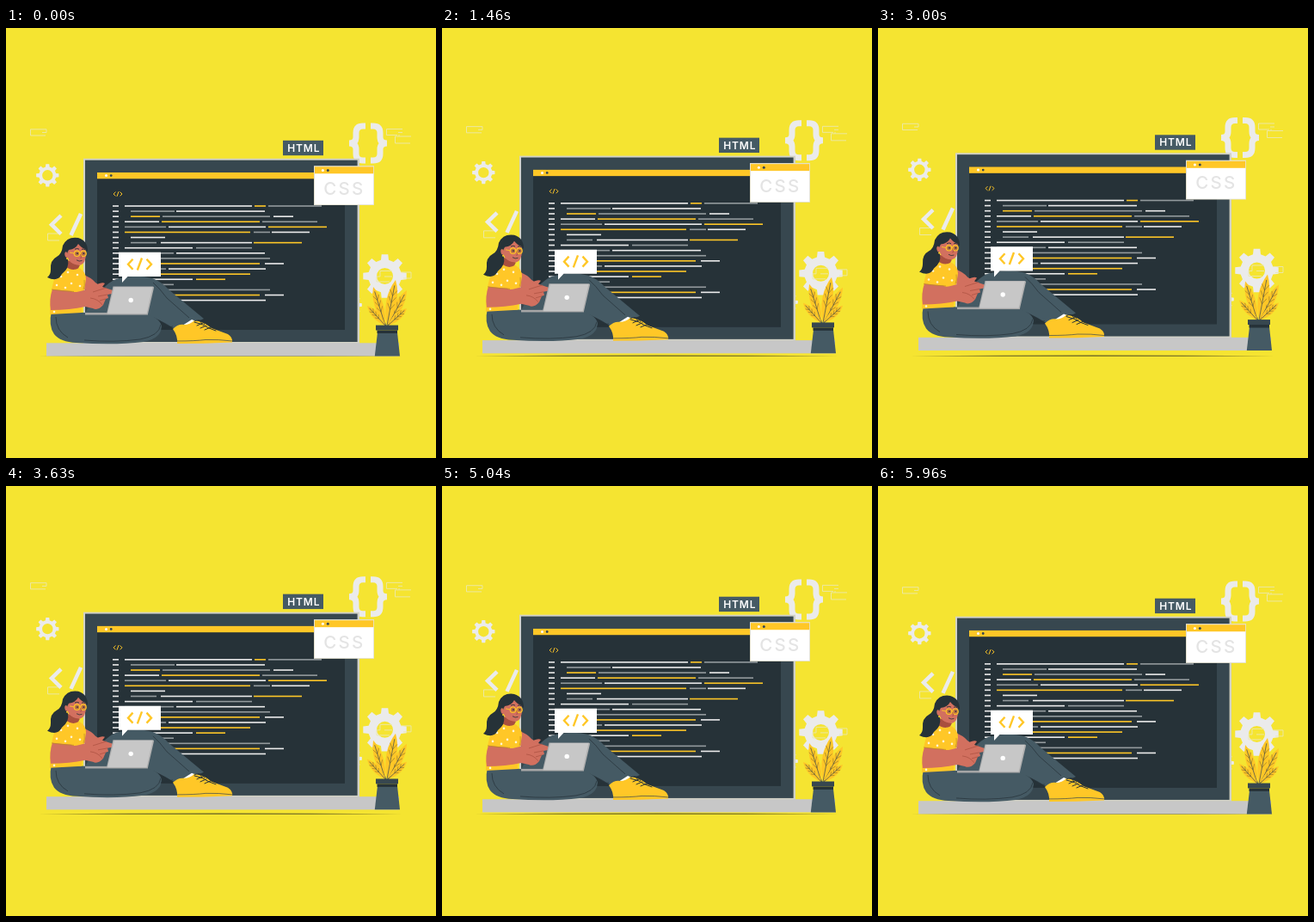
Write an HTML page with a canvas that moves like this. It is 500x500 px and loops after 6000 ms.

```html
<!DOCTYPE html>
<html lang="en">
<head>
<meta charset="utf-8">
<title>Floating workspace</title>
<style>
html, body { margin: 0; width: 100%; height: 100%; overflow: hidden; background: #f5e431; }
canvas { display: block; width: 500px; height: 500px; }
</style>
</head>
<body>
<canvas id="stage"></canvas>
<script>
const LOOP = 6000, LIFT = 6.5;
const BG = '#f5e431', SUN = '#ffc727', INK = '#263238', SLATE = '#37474f', DENIM = '#455a64';
const PALE = '#ebebeb', STEEL = '#c7c7c7', SKIN = '#d2705f', SHADE = '#a9503f', WHITE = '#fff';

const canvas = document.getElementById('stage');
const ctx = canvas.getContext('2d');
const ratio = window.devicePixelRatio || 1;
canvas.width = canvas.height = 500 * ratio;

function fill(d, color) {
  ctx.fillStyle = color;
  ctx.fill(new Path2D(d));
}

function line(d, color, width = 1, cap = 'butt') {
  ctx.strokeStyle = color;
  ctx.lineWidth = width;
  ctx.lineCap = cap;
  ctx.stroke(new Path2D(d));
}

function box(x, y, right, bottom, color) {
  ctx.fillStyle = color;
  ctx.fillRect(x, y, right - x, bottom - y);
}

function dot(x, y, r, color) {
  ctx.fillStyle = color;
  ctx.beginPath();
  ctx.arc(x, y, r, 0, Math.PI * 2);
  ctx.fill();
}

function label(text, x, y, font, spacing, color) {
  ctx.font = font + ' Inter, "Open Sans", sans-serif';
  ctx.letterSpacing = spacing + 'px';
  ctx.fillStyle = color;
  ctx.fillText(text, x, y);
}

function gear(x, y, r, hole) {
  const teeth = 8, step = Math.PI * 2 / teeth;
  const corners = [[-0.3, 0.76], [-0.19, 1], [0.19, 1], [0.3, 0.76]];
  ctx.beginPath();
  for (let i = 0; i < teeth; i++) {
    for (const [turn, reach] of corners) {
      const a = (i + turn) * step - Math.PI / 2;
      ctx.lineTo(x + Math.cos(a) * r * reach, y + Math.sin(a) * r * reach);
    }
  }
  ctx.closePath();
  ctx.moveTo(x + hole, y);
  ctx.arc(x, y, hole, 0, Math.PI * 2);
  ctx.fillStyle = PALE;
  ctx.fill('evenodd');
}

function brace() {
  line('M418 114h-3q-8 0-8 8v5q0 7-8 7q8 0 8 7v5q0 8 8 8h3', PALE, 7);
}

function backdrop() {
  const thin = '#ebe8ae';
  line('M47 121.5V117.8H28.5V125H46M42 121.5h5', thin, 0.9);
  line('M461 117.5H442.5V124.5H455M456 121.5h5', thin, 0.9);
  line('M471 126H452.5V134H470M457 126v-2', thin, 0.9);
  line('M63 239H48.5V247H62', thin, 0.9);
  gear(48.3, 171.3, 13.3, 6.2);
  gear(440.5, 288.5, 25.5, 9.5);
  line('M449 282.5H435V289H431V295H446M440 289h9', thin, 0.9);
  line('M459 284h12v7h-9', thin, 0.9);
  gear(402, 322, 12, 5);
  brace();
  ctx.save();
  ctx.translate(842, 0);
  ctx.scale(-1, 1);
  brace();
  ctx.restore();
  line('M64 218L53 228.7L64 239.5M87 216L75.5 241', PALE, 4.5);
}

const ROWS = [
  'W138-286 Y289-302 G305-367', 'G145-196 W198-301', 'Y145-179 G182-307 W311-334',
  'W138-178 Y181-295 G298-362', 'G138-186 W189-302 Y305-373', 'Y138-284 G288-307 W309-353',
  'W145-185', 'G145-175 W180-286 Y288-344', 'W138-217 G221-286', 'G138-195 W198-301',
  'G145-307', 'Y145-295 W301-323', 'G138-186 W189-302', 'Y138-284', 'W145-217 Y221-255',
  'G145-195', 'G145-307', 'Y138-295 W301-323', 'G138-186 W189-302'
];
const TONES = { W: '#ececec', Y: SUN, G: '#939a9d' };

function monitor() {
  box(90, 151.8, 411, 367, '#d2d2c6');
  box(92, 153.7, 408.6, 365, SLATE);
  box(106, 168, 394, 351, INK);
  box(106, 168, 394, 175.3, SUN);
  dot(116.5, 171.6, 1.5, WHITE);
  dot(122.2, 171.6, 1.4, SLATE);
  line('M127.5 190.6l-2.4 2.4l2.4 2.4M131 190.2l-2 5.6M132.6 190.6l2.4 2.4l-2.4 2.4', SUN, 1);
  ROWS.forEach((row, i) => {
    const y = 207 + i * 6.09;
    if (i < 16) box(124, y - 0.8, 131, y + 0.8, TONES.W);
    for (const part of row.split(' ')) {
      const [from, to] = part.slice(1).split('-').map(Number);
      box(from, y - 0.8, to, y + 0.8, TONES[part[0]]);
    }
  });
}

function tags() {
  box(322, 130.8, 369, 148.2, DENIM);
  label('HTML', 327.2, 143.9, '600 12px', 0.9, WHITE);
  box(358, 160.2, 428, 206, '#e2dfcf');
  box(359, 161.3, 427.2, 205.2, WHITE);
  box(359, 161.3, 427.2, 169.3, SUN);
  dot(368.4, 165.5, 1.5, WHITE);
  dot(374.3, 165.5, 1.5, SLATE);
  label('CSS', 369.2, 193.8, '500 20.5px', 2.3, '#e4e4e4');
}

function leaf(x, y, tipX, tipY, width) {
  const dx = tipX - x, dy = tipY - y, len = Math.hypot(dx, dy);
  const nx = -dy / len * width, ny = dx / len * width;
  const mx = x + dx * 0.55, my = y + dy * 0.55;
  fill(`M${x} ${y}Q${mx + nx} ${my + ny} ${tipX} ${tipY}Q${mx - nx} ${my - ny} ${x} ${y}`, SUN);
  line(`M${x} ${y}L${x + dx * 0.88} ${y + dy * 0.88}`, SLATE, 0.7);
  for (const k of [0.35, 0.5, 0.65]) {
    const px = x + dx * k, py = y + dy * k;
    const fx = dx * 0.13, fy = dy * 0.13;
    line(`M${px + nx * 0.35 + fx} ${py + ny * 0.35 + fy}L${px} ${py}L${px - nx * 0.35 + fx} ${py - ny * 0.35 + fy}`, '#6b5a2c', 0.5);
  }
}

function plant() {
  line('M436 336Q441 340 442 347M452 330Q447 339 444 347', SLATE, 0.8);
  leaf(441, 346, 427, 301, 10);
  leaf(441, 346, 420, 323, 8);
  leaf(444, 346, 466, 305, 10);
  leaf(444, 346, 466, 326, 8);
  leaf(443, 346, 453, 293, 12);
  fill('M432 354H455L458 381.5H428.8Z', DENIM);
  box(430, 345.6, 456, 351.5, SLATE);
  box(431.5, 351.5, 455, 355, INK);
}

function legs() {
  fill('M92 331Q112 298 128 292Q150 286 170 291Q181 295 189 304L230 338L199 352Q183 342 172 337L130 350Z', DENIM);
  line('M171 296Q179 303 187 314L213 337M172 337Q187 344 199 352', INK, 0.7);
  fill('M53 329Q49 346 56 356Q63 365 82 366Q126 369 160 365Q181 361 181 346Q177 335 160 333L92 331Z', DENIM);
  line('M58 336Q58 352 72 360M91 363Q126 366 156 362Q178 358 180 345', INK, 0.7);
  line('M180 350Q187 348 194 347', INK, 0.6);
}

function shoe() {
  fill('M205 346L216 339L221 341L211 347Z', WHITE);
  fill('M194 350Q200 344 207 345Q214 345 219 340Q230 341 239 349L258 356Q264 360 263 365.5Q230 367 199 367Q200 358 194 350Z', SUN);
  line('M199 364Q220 364 232 362.5Q247 362 263 364', SLATE, 0.7);
  line('M219 342Q229 344 236 349L244 352M222 346l7-3M226 349l7-3M231 351l7-3', INK, 1, 'round');
  line('M219 341q6-3 9 3M223 340q5-1 8 5', INK, 0.9);
}

function torso() {
  fill('M90 287Q99 290 104 296L114 303L106 310L91 304Z', SKIN);
  fill('M71 270L85 274L84 281Q78 285 69 278Z', SHADE);
  fill('M69 277Q77 284 85 279Q93 283 93 292L91 305L88 331L51 333Q51 312 54 300Q58 281 69 277Z', SUN);
  fill('M54 304L76 306Q78 309 94 304L104 299Q112 295 115 297L112 301L124 305L123 309L118 310L119 314L116 315L113 322Q107 329 101 326L92 324Q74 328 52 328Q50 315 54 304Z', SKIN);
  line('M101 307L117 302M107 312L118 310M109 317L116 315M98 314Q107 315 112 322', SHADE, 0.7);
  line('M53 304Q65 306 79 306.5M91 293Q92 300 90 304', '#b98c22', 0.7);
  for (const [x, y] of [[64, 289], [72, 284], [83, 287], [76, 297], [59, 299], [69, 302], [86, 300], [56, 330]]) {
    dot(x, y, 1.3, '#fff6d5');
  }
}

function head() {
  fill('M74 249Q82 247 91 252Q95 263 91 272Q87 278 79 275Q71 271 71 262Z', SKIN);
  fill('M70 269Q78 276 86 276L84 279Q75 279 70 274Z', SHADE);
  fill('M95 260Q95 247 84 244Q71 242 66 253Q65 263 59 266Q51 270 52 281Q52 287 48 290Q60 296 65 286Q74 279 72 270Q69 264 73 258Q81 257 84 251Q88 256 92 257Q93 259 95 260Z', INK);
  fill('M70 260Q67 261 69 266Q71 268 74 266Z', SKIN);
  line('M74 261L79 262', SUN, 0.9);
  for (const x of [82.5, 90]) {
    dot(x, 262.3, 3.8, SUN);
    dot(x, 262.3, 2.6, '#bd7046');
    dot(x + 0.4, 262.2, 0.9, INK);
  }
  line('M80 257.2q3-1.5 5 0M88 257.4q2-1 4 .3', INK, 0.9);
  line('M86.6 263l1.3 4l-1.8.4', SHADE, 0.8);
  line('M82 269.8Q85 272 88.5 270.5', INK, 0.8);
  dot(71, 268, 1, SUN);
}

function laptop() {
  box(92, 331, 165, 333.6, '#a6a6a6');
  fill('M124.5 300.5H170.5Q172.3 300.5 172 302L165 332.5H117Z', '#b0b0b0');
  fill('M125.8 301.2H170.5L163.5 332.3H118Z', STEEL);
  dot(145.2, 316.5, 2.7, WHITE);
}

function bubble() {
  fill('M131 260.8H180V289H141.5L135 296V289H131Z', WHITE);
  line('M147.5 268.8L142 274.8L147.5 280.8M158 267.5L152.8 281.5M163.5 268.8L169 274.8L163.5 280.8', SUN, 2.4);
}

function draw(time) {
  const phase = time % LOOP / LOOP;
  const rise = LIFT * (1 - Math.abs(1 - 2 * phase));
  ctx.setTransform(ratio, 0, 0, ratio, 0, 0);
  box(0, 0, 500, 500, BG);
  fill('M38 381.2Q249 379.9 461 381.2Q249 382.2 38 381.2Z', '#5f5b25');
  ctx.translate(0, -rise);
  backdrop();
  monitor();
  tags();
  box(47, 366.3, 457, 381.5, STEEL);
  plant();
  legs();
  shoe();
  torso();
  head();
  laptop();
  bubble();
}

const start = performance.now();
function tick() {
  draw(performance.now() - start);
  requestAnimationFrame(tick);
}
tick();
</script>
</body>
</html>
```
